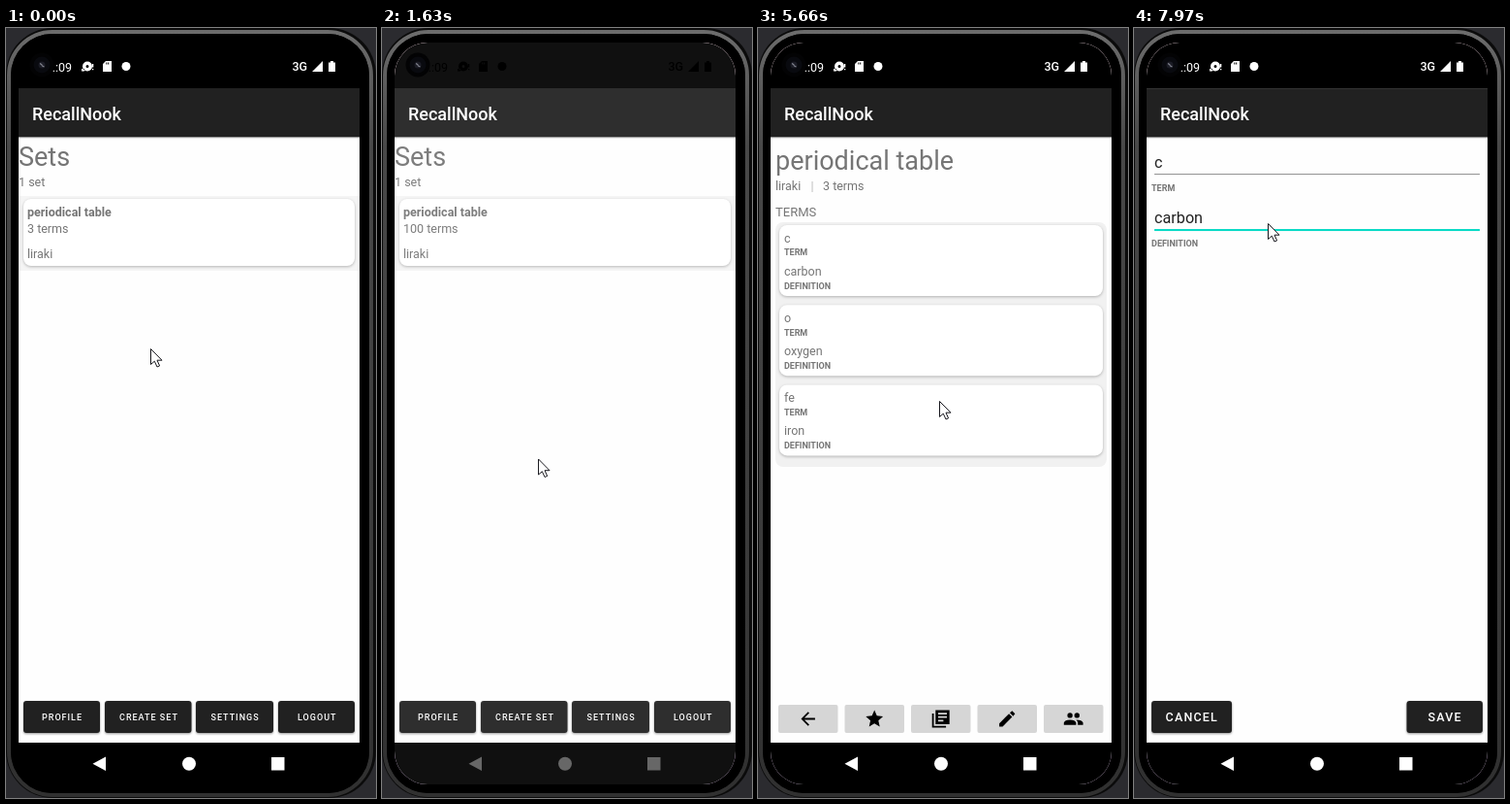
These frames come from a looping animation (382x793 px, 8 s). An HTML page:

```html
<!DOCTYPE html>
<html lang="en">
<head>
<meta charset="utf-8">
<title>Flashcard app</title>
<style>
html, body { margin: 0; width: 100%; height: 100%; overflow: hidden; background: #2b2b2f; }
svg { display: block; width: 382px; height: 793px; }
text { font-family: Roboto, Arial, sans-serif; white-space: pre; }
path { fill-rule: evenodd; }
.card { filter: drop-shadow(0 1.5px 1.5px #0004); }
.btn { filter: drop-shadow(0 1px 1px #0006); }
</style>
</head>
<body>
<svg viewBox="0 0 382 793">
  <defs>
    <clipPath id="display"><rect x="13" y="15" width="352" height="764" rx="34"/></clipPath>
    <linearGradient id="metal" x2="0" y2="1">
      <stop stop-color="#6c6c6c"/><stop offset=".15" stop-color="#484848"/>
      <stop offset=".7" stop-color="#3a3a3a"/><stop offset="1" stop-color="#303030"/>
    </linearGradient>
    <linearGradient id="dusk" x2="0" y2="1">
      <stop stop-color="#eeacc5"/><stop offset=".46" stop-color="#e9a6c0"/>
      <stop offset=".62" stop-color="#d58aa9"/><stop offset=".7" stop-color="#b9668e"/>
      <stop offset=".75" stop-color="#bb4f83"/><stop offset=".84" stop-color="#642a6c"/>
    </linearGradient>
    <linearGradient id="hill" x2="0" y2="1">
      <stop stop-color="#2d0f4b"/><stop offset="1" stop-color="#200c33"/>
    </linearGradient>
  </defs>

  <rect width="382" height="793" rx="48" fill="#0b0b0b"/>
  <rect x="3" y="4" width="374" height="786" rx="45" fill="none" stroke="url(#metal)" stroke-width="4"/>
  <rect x="5" y="6" width="370" height="782" rx="43"/>

  <g clip-path="url(#display)">
    <rect x="13" y="15" width="352" height="764"/>
    <g id="home">
      <rect x="13" y="15" width="352" height="764" fill="url(#dusk)"/>
      <path d="M13 664Q36 658 54 653T92 650Q150 658 220 640T365 650V779H13Z" fill="url(#hill)"/>
    </g>
    <rect id="launch" fill="#fff"/>
    <g id="screens"></g>
    <g id="status">
      <text x="68" y="44.7" font-size="12.5" text-anchor="end">.:09</text>
      <path d="M79 39.5a5 5 0 1 1 10 0a5 5 0 1 1-10 0M82.5 39.5a1.5 1.5 0 1 0 3 0a1.5 1.5 0 1 0-3 0M78 42h3v2.5h-3zM89 37h1.3v3.5h-1.3zM89 42h1.3v1.3h-1.3z"/>
      <path d="M103 34H109V45H100V37ZM103.3 35.5v2h1v-2zM105.2 35.5v2h1v-2z"/>
      <circle cx="124" cy="39.5" r="4.5"/>
      <text x="295.5" y="44" font-size="12.5" font-weight="500">3G</text>
      <path d="M327 34V45H316ZM333 35.5h2V34h3v1.5h2V45h-7z"/>
    </g>
    <g id="nav">
      <path d="M89.500 757.700L103 750.500V765ZM274 751h13.500v13.500h-13.500z"/>
      <circle cx="189" cy="757.800" r="7"/>
    </g>
  </g>

  <circle cx="37" cy="38" r="12.5" fill="#030304"/>
  <circle cx="37" cy="38" r="8.5" fill="#090a0f"/>
  <circle cx="37" cy="38" r="3.500" fill="#1b1c25"/>
  <path d="M35.500 36.800l1.500 1.200M37.500 39l1.500 .8" stroke="#82848f" stroke-width="1.300" stroke-linecap="round"/>

  <path id="cursor" d="M.5 .5V16.5L4.3 13.2L7 19L9.6 17.9L7 12.2H12Z" fill="#fff" stroke="#16161c"/>
</svg>
<script>
const $ = id => document.getElementById(id);
const APP = 'RecallNook', OWNER = 'liraki', SET = 'periodical table';
const TERMS = [['c', 'carbon'], ['o', 'oxygen'], ['fe', 'iron']];
const GREY = '#757575', DARK = '#212121', TEAL = '#03dac5';

const star = () => 'M' + Array.from({ length: 10 }, (_, i) => {
  const r = i % 2 ? 4.8 : 10.4, a = i * Math.PI / 5;
  return [12 + r * Math.sin(a), 12.4 - r * Math.cos(a)];
}).join('L') + 'Z';
const head = x => `M${x - 3} 8a3 3 0 1 1 6 0a3 3 0 1 1-6 0`;

// Drawn on a 24-unit grid
const ICONS = {
  back: 'M20 11H7.8L13.4 5.4 12 4 4 12 12 20 13.4 18.6 7.8 13H20Z',
  star: star(),
  books: 'M2 6H4V20H18V22H2ZM6 2H22V18H6ZM9 5V7H19V5ZM9 9V11H19V9ZM9 13V15H15V13Z',
  edit: 'M3 17.2V21H6.8L17.8 9.9 14.1 6.2ZM15.1 5.1 17.7 2.9 21.1 6.3 18.9 8.9Z',
  people: head(8) + head(16) + 'M1 19V16.5Q2 13 8 13T15 16.5V19ZM17 19V16.5Q17 14.5 15 13Q22 13 23 16.5V19Z',
  bin: 'M6 7H18V19l-2 2H8L6 19ZM5 4H8.5l1-1h5l1 1H19V6H5Z',
  plus: 'M11 5h2v6h6v2H13v6H11V13H5V11h6Z'
};

const text = (x, y, s, size = 12.5, weight = 400, fill = GREY, gap = 0, id = '') =>
  `<text x="${x}" y="${y}" font-size="${size}" font-weight="${weight}" fill="${fill}" letter-spacing="${gap}" id="${id}">${s}</text>`;
const label = (x, y, s) => text(x, y, s, 9, 700);
const rect = (x, y, x2, y2, fill, r = 0, cls = '') =>
  `<rect x="${x}" y="${y}" width="${x2 - x}" height="${y2 - y}" rx="${r}" fill="${fill}" class="${cls}"/>`;
// Full-width bands overshoot the display so that scaling never bares its edges.
const band = (y, y2, fill) => rect(0, y, 382, y2, fill);
const card = (x, y, x2, y2) => rect(x, y, x2, y2, '#fff', 8, 'card');
const icon = (name, x, y, k = .9) =>
  `<path d="${ICONS[name]}" transform="translate(${x} ${y}) scale(${k}) translate(-12 -12)"/>`;
const button = (x, x2, y, tx, s, size, gap) =>
  rect(x, y, x2, y + 33, DARK, 3, 'btn') + text(tx, y + 16.5 + size * .36, s, size, 500, '#fff', gap);
const smallButton = (x, x2, tx, s) => button(x, x2, 693, tx, s, 9, 1);
const bigButton = (x, x2, y, tx, s) => button(x, x2, y, tx, s, 12.5, 1.2);

const screen = (id, body) => `<g id="${id}">` +
  band(0, 793, '#000') + band(62, 736, '#fefefe') + band(112.4, 113.6, '#ddd') + band(62, 112.4, DARK) +
  text(27, 95, APP, 18, 500, '#fff') + body + '</g>';

const pair = ([term, meaning], x, y) =>
  text(x, y, term) + label(x, y + 13.3, 'TERM') +
  text(x, y + 34, meaning) + label(x, y + 47.5, 'DEFINITION');

$('screens').innerHTML =
  screen('sets',
    text(13, 141.7, 'Sets', 27) + text(13, 163, '1 set') +
    band(173, 250, '#f5f5f5') + card(18, 176, 360, 245) +
    text(22, 193.5, SET, 12.5, 700) + text(22, 211, '', 12.5, 400, GREY, 0, 'count') + text(22, 237, OWNER) +
    smallButton(18, 97, 37, 'PROFILE') + smallButton(102, 191.5, 117, 'CREATE SET') +
    smallButton(196, 276, 211.5, 'SETTINGS') + smallButton(281, 360, 301, 'LOGOUT')) +
  screen('detail',
    text(18, 146, SET, 27) + text(18, 167, OWNER) + text(54.5, 167, '|', 12.5, 400, '#bbb') +
    text(67, 167, '3 terms') + text(18, 194, 'TERMS', 13) +
    rect(18, 200, 360, 452, '#f1f1f1', 8) +
    TERMS.map((t, i) => {
      const y = 203 + 82.2 * i;
      return card(22, y, 356, y + 73) + pair(t, 27, y + 18);
    }).join('') +
    ['back', 'star', 'books', 'edit', 'people'].map((name, i) => {
      const x = 21 + 68.5 * i;
      return rect(x, 697, x + 61.5, 726, '#d6d6d6', 2) + icon(name, x + 30.7, 711.5);
    }).join('')) +
  screen('editor',
    text(13, 142.3, SET, 18, 700) + label(13, 158.3, 'TITLE') + icon('edit', 353.2, 135.5, 1) +
    rect(12, 172, 366, 489, '#f1f1f1', 8) +
    TERMS.map((t, i) => {
      const y = 175.3 + 103.7 * i;
      return card(17.5, y, 360.5, y + 94.5) + pair(t, 22, y + 39.3) +
        icon('edit', 319, y + 15.5, .92) + icon('bin', 345.2, y + 15.5);
    }).join('') +
    bigButton(12, 91.5, 698, 34.5, 'BACK') +
    `<circle cx="189" cy="706.5" r="25.2" fill="${TEAL}" style="filter:drop-shadow(0 2px 2px #0005)"/>` +
    icon('plus', 189, 706.5)) +
  screen('form',
    text(21, 143.5, TERMS[0][0], 16.2, 400, DARK) + rect(21, 150, 357, 151, '#8f8f8f') + label(18, 167.5, 'TERM') +
    text(21, 201, TERMS[0][1], 16.2, 400, DARK) + rect(21, 207, 357, 209, TEAL) + label(18, 225, 'DEFINITION') +
    bigButton(18, 101, 693, 32.5, 'CANCEL') + bigButton(281.5, 360, 693, 303.5, 'SAVE'));

const LOOP = 8000;

// Where the hand pauses or turns: time, x, y
const POINTER = [[0, 149, 330], [300, 149, 332], [820, 151, 351], [1630, 161, 444],
  [2080, 182, 215], [2360, 182, 215], [3110, 176, 532], [3650, 157, 234], [5530, 157, 234],
  [5910, 244, 669], [6490, 248, 707], [7000, 289, 199], [7300, 309, 194], [7450, 309, 194], [7970, 138, 201]];

// Each screen grows in over the one before, which swells as it leaves.
const OPENINGS = [['detail', 2310], ['editor', 6150], ['form', 7439]];

const ramp = (t, from, to) => Math.min(1, Math.max(0, (t - from) / (to - from)));
const settle = ms => ms > 0 ? 1 - Math.exp(-ms / 85) : 0;

function pointerAt(t) {
  const n = POINTER.findIndex(p => p[0] > t);
  if (n < 0) return POINTER.at(-1).slice(1);
  const [t0, x0, y0] = POINTER[n - 1], [t1, x1, y1] = POINTER[n], f = ramp(t, t0, t1);
  return [x0 + (x1 - x0) * f, y0 + (y1 - y0) * f];
}

const set = (el, attrs) => Object.entries(attrs).forEach(([k, v]) => el.setAttribute(k, v));
const tint = (id, v) => set($(id), { fill: `rgb(${v},${v},${v})` });
const show = (id, alpha, scale = 1) => set($(id), {
  opacity: alpha,
  display: alpha > 0 ? 'inline' : 'none',
  transform: `translate(189 399) scale(${scale}) translate(-189 -399)`
});

function drawLaunch(t) {
  const left = Math.max(0, (1120 - t) / 300);
  const x = 13 + 57 * left ** 2.8, y = 15 + 17 * left, bottom = 779 - 21 * left;
  set($('launch'), { x, y, width: 365 - x, height: bottom - y, opacity: t < 690 ? 0 : 1 });
}

function drawScreens(t) {
  const fadeIn = 1 - (1 - ramp(t, 1360, 1780)) ** 2.7;
  const layers = [['sets', t < 300 ? 1 : fadeIn, 1],
    ...OPENINGS.map(([id, start]) => [id, ramp(t, start + 30, start + 280), .85 + .15 * settle(t - start)])];
  layers.forEach(([id, alpha, scale], i) => {
    const covered = layers[i + 1]?.[1] === 1;
    const leaving = OPENINGS[i] ? settle(t - OPENINGS[i][1]) : 0;
    show(id, covered ? 0 : alpha, scale + .045 * leaving);
  });
  $('count').textContent = t >= 1120 && t < 1780 ? '100 terms' : '3 terms';
}

function draw(t) {
  show('home', ramp(t, 420, 550));
  drawLaunch(t);
  drawScreens(t);
  tint('status', 255 * (1 - ramp(t, 970, 1240) + ramp(t, 1780, 2080)));
  tint('nav', 102 + 153 * (1 - ramp(t, 1120, 1240) + ramp(t, 1630, 1930)));
  set($('cursor'), { transform: `translate(${pointerAt(t)})` });
}

const begin = performance.now();
(function frame() {
  draw((performance.now() - begin) % LOOP);
  requestAnimationFrame(frame);
})();
</script>
</body>
</html>
```
